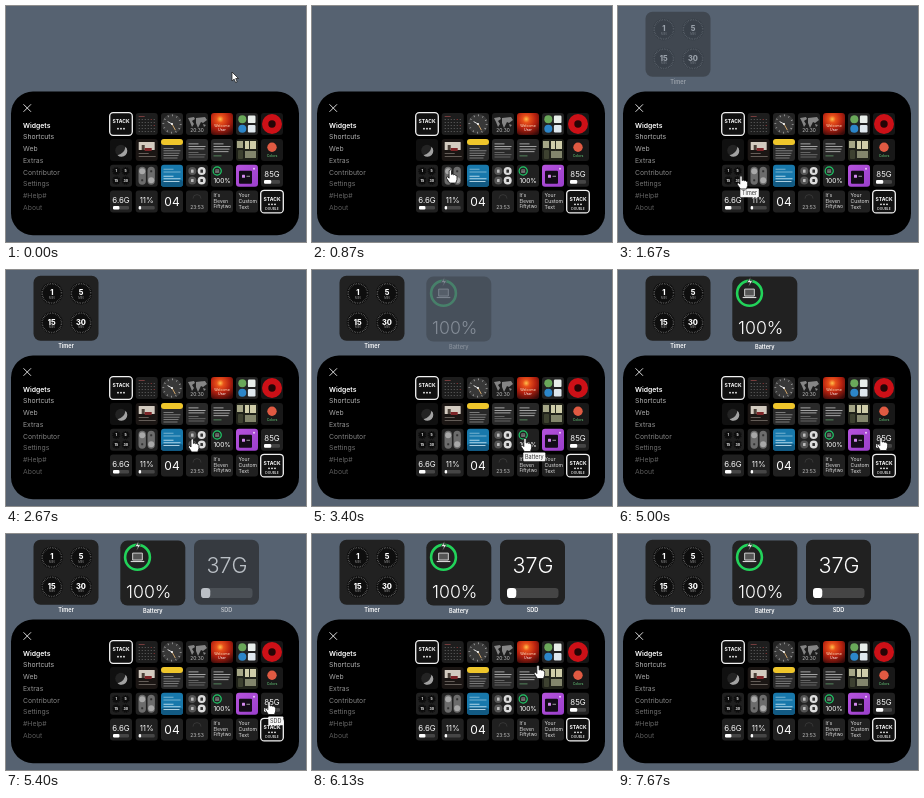
These frames come from a looping animation (300 px wide and 236 px high, 9 s). An HTML page:

```html
<!DOCTYPE html>
<html lang="en">
<head>
<meta charset="utf-8">
<title>Widget picker</title>
<style>
html, body { margin: 0; width: 100%; height: 100%; overflow: hidden; background: #566271; }
svg { display: block; width: 100vw; height: 100vh; font-family: Inter, Roboto, sans-serif; }
</style>
</head>
<body>
<svg id="stage" viewBox="0 0 300 236"></svg>
<script>
const FRAME = 0.015, LOOP = 9000;
const TAU = Math.PI * 2;

const rect = (x, y, w, h, r, fill, extra = '') =>
  `<rect x="${x}" y="${y}" width="${w}" height="${h}" rx="${r}" fill="${fill}" ${extra}/>`;
const disc = (x, y, r, fill, extra = '') =>
  `<circle cx="${x}" cy="${y}" r="${r}" fill="${fill}" ${extra}/>`;
const ring = (x, y, r, color, w, extra = '') =>
  disc(x, y, r, 'none', `stroke="${color}" stroke-width="${w}" ${extra}`);
const path = (d, color, w, fill = 'none') =>
  `<path d="${d}" fill="${fill}" stroke="${color}" stroke-width="${w}"/>`;
const text = (x, y, size, str, fill = '#fff', weight = 400, anchor = 'middle') =>
  `<text x="${x}" y="${y}" font-size="${size}" fill="${fill}" font-weight="${weight}" text-anchor="${anchor}">${str}</text>`;
const group = (x, y, body, scale = 1) =>
  `<g transform="translate(${x} ${y}) scale(${scale})">${body}</g>`;
const range = n => [...Array(n).keys()];

const ticks = (r, color, w, len, n) => {
  const step = TAU * r / n;
  return ring(0, 0, r, color, len, `stroke-dasharray="${w} ${step - w}"`);
};
const hand = (turn, len, color, w) =>
  path(`M0 0L${Math.sin(turn * TAU) * len} ${-Math.cos(turn * TAU) * len}`, color, w);
const laptop = (x, y, s) => group(x, y,
  path('M-4.6 -4h9.2v6.6h-9.2z', '#d8d8d8', 0.9, '#555') + path('M-6.5 4h13', '#d8d8d8', 1.1), s);
const lines = (n, x, y, gap, color) =>
  range(n).map(i => rect(x, y + i * gap, 10 + (i * 7) % 8, 0.8, 0, color)).join('');
const bar = (x, y, w, h, part) =>
  rect(x, y, w, h, h / 3, '#454545') + rect(x, y, w * part, h, h / 3, '#fff');

// Tiles are 22 by 22, drawn around their own centre
const stack = sub => rect(-11.3, -11.3, 22.6, 22.6, 3.5, '#111', 'stroke="#f2f2f2" stroke-width="1.3"') +
  text(0, sub ? -0.5 : -0.8, 5, 'STACK', '#fff', 700) +
  [-3, 0, 3].map(x => disc(x, sub ? 2.7 : 4.7, 0.85, '#fff')).join('') +
  (sub ? text(0, 8.2, 3.3, sub, '#ddd', 600) : '');
const meter = (label, part) => text(0, 0.9, 7.8, label, '#f4f4f4') + bar(-8, 4.3, 16, 3.6, part);
const quads = fn => range(4).map(i => group(i % 2 ? 4.7 : -4.7, i > 1 ? 4.7 : -4.7, fn(i))).join('');
const words = (list, size) =>
  list.map((s, i) => text(-8.5, -4.3 + i * size * 1.17, size, s, '#e4e4e4', 400, 'start')).join('');

const tiles = [
  ['#111', stack()],
  ['#1d1d1d', rect(-8, -8, 6, 0.8, 0, '#8a4444') + range(30).map(i =>
    disc(-7.5 + i % 6 * 3, -4.5 + Math.floor(i / 6) * 3, 0.5, i % 13 == 4 ? '#c04444' : '#7a7a7a')).join('')],
  ['#222', disc(0, 0, 10, '#383838') + ticks(8.6, '#b5b5b5', 0.7, 1.8, 12) +
    hand(0.83, 5, '#e0e0e0', 1) + hand(0.42, 7, '#e0b070', 0.9) + disc(0, 0, 1, '#fff')],
  ['#1d1d1d', '<path d="M-9-6l6-1 1 2-3 2 2 3-2 3-2-5zM-1-6l9-1 2 3-4 3-2-1-1 2-2 4-2-5zM6 0l3 1-2 2z" fill="#858585"/>' +
    text(0, 8.3, 4.8, '20:30', '#c9c9c9')],
  ['url(#sunset)', text(0, 2.6, 3.5, 'Welcome', '#ffe9c9') + text(0, 6.9, 3.5, 'User')],
  ['#222', quads(i => i % 2 ? rect(-3.8, -3.8, 7.6, 7.6, 1.2, i > 1 ? '#dfe8ee' : '#e8eeea')
    : disc(0, 0, 4, i > 1 ? '#2c86c9' : '#6aa85a'))],
  ['#151515', disc(0, 0, 10, '#cc1017') + disc(0, 0, 3.7, '#250506')],

  ['#101010', disc(0, 0.5, 5.8, '#232323') + '<path d="M4.5-3.2A5.8 5.8 0 0 1-3.5 5.2Q3.5 3.5 4.5-3.2" fill="#a2a2a2"/>'],
  ['#1b1614', rect(-8, -8, 16, 8, 0.5, '#d3cbc0') + rect(-5, -5, 3, 5, 0, '#4b4038') +
    rect(-2, -2, 7, 3, 0, '#7d2528') + lines(2, -8, 3, 3, '#77706a')],
  ['#282828', rect(-11, -11, 22, 6, 3, '#efc62b') + lines(5, -8.5, -2, 2.4, '#8f8f8f')],
  ['#292929', lines(3, -8.5, -6.5, 2.5, '#c4c4c4') + lines(3, -8.5, 2, 2.3, '#737373')],
  ['#262626', lines(4, -8.5, -6.5, 2.6, '#c0c0c0') + rect(-8.5, 5.5, 8, 0.8, 0, '#5f9a68')],
  ['#20221a', rect(-10, -9, 6, 7, 0, '#a5a686') + rect(-2, -9, 11, 8, 0, '#cfcda9') +
    rect(2, -9, 1, 17, 0, '#2a2c20') + rect(-2, 1, 11, 7, 0, '#83866c') + rect(-9, 0, 5, 9, 1, '#3d4130')],
  ['#181818', disc(0, -2.8, 4.7, '#e05a42') + text(0, 7, 3.4, 'Colors', '#58a968', 600)],

  ['#202020', quads(i => disc(0, 0, 4.2, '#0c0c0c') + ticks(3.7, '#555', 0.4, 0.6, 12) +
    text(0, 1.3, 3.5, [1, 5, 15, 30][i], '#fff', 700))],
  ['#222', [-4.5, 4.5].map(x => rect(x - 3.7, -9, 7.4, 18, 3.7, '#6c6c6c') +
    disc(x, x, 3, '#a8a8a8') + rect(x - 1, -x - 1, 2, 2, 0.5, '#333')).join('')],
  ['#1878ab', rect(-11, 4, 22, 7, 3, '#125a83') + lines(2, -8.5, -7, 2.8, '#8cc1da') +
    lines(3, -8.5, 0, 2.6, '#d4edf8')],
  ['#222', quads(i => disc(0, 0, 4, i % 2 ? '#dcdcdc' : '#555') + rect(-1.3, -1.6, 2.6, 3.2, 0.5, i % 2 ? '#333' : '#bbb'))],
  ['#202020', ring(-4.8, -4.8, 4.1, '#20c968', 1.2) + laptop(-4.8, -4.8, 0.34) + text(0, 7.7, 6.5, '100%')],
  ['url(#violet)', rect(-8, -5, 13, 13, 1, '#130b18') + rect(-5, -1, 3, 3, 0.5, '#d48af0') +
    rect(-0.5, 0, 3.5, 0.9, 0, '#aaa') + disc(7, -7, 1, '#edc9fa')],
  ['#202020', meter('85G', 0.45)],

  ['#202020', meter('6.6G', 0.4)],
  ['#202020', meter('11%', 0.15)],
  ['#202020', text(0, 4.3, 12, '04')],
  ['#202020', path('M-4 -3a4 4 0 0 1 8 0', '#444', 0.6) + text(0, 7.4, 5, '23:53', '#c6c6c6')],
  ['#202020', words(["It's", 'Eleven', 'Fiftytwo'], 4.6)],
  ['#202020', words(['Your', 'Custom', 'Text'], 5.1)],
  ['#111', stack('DOUBLE')]
];
const cols = [115, 140.7, 166, 191, 216, 241, 266], rows = [118, 144, 169.8, 195.6];
const grid = tiles.map(([fill, body], i) =>
  group(cols[i % 7], rows[Math.floor(i / 7)], rect(-11, -11, 22, 22, 3, fill) + body)).join('');

const menu = [['Widgets', '#fff'], ['Shortcuts', '#b5b5b5'], ['Web', '#a2a2a2'], ['Extras', '#929292'],
  ['Contributor', '#808080'], ['Settings', '#707070'], ['#Help#', '#626262'], ['About', '#585858']]
  .map(([s, c], i) => text(17, 121.7 + i * 11.75, 6.85, s, c, i ? 400 : 600, 'start')).join('');

const dial = (x, y, n) => group(x, y, disc(0, 0, 11, '#0e0e0e') + ticks(9.7, '#8a8a8a', 0.45, 1.5, 36) +
  text(0, 1.8, 7.4, n, '#fff', 800) + text(0, 5.6, 2.8, 'MIN', '#999'));
const widget = (id, x, y, label, body) => `<g id="${id}">` + rect(x, y, 65, 65, 7, '#212121') +
  body + text(x + 32.5, y + 72.2, 5.6, label, '#fff', 600) + '</g>';
const widgets =
  widget('timer', 27.5, 5.7, 'Timer', dial(45.8, 23.4, 1) + dial(75, 23.4, 5) + dial(45.8, 52.8, 15) + dial(75, 52.8, 30)) +
  widget('battery', 114.3, 6.6, 'Battery', ring(131.5, 23.3, 12.4, '#22d35a', 2.6) + laptop(131.5, 23.3, 1.05) +
    path('M133 6.8l-4 5.6h2.7l-1.2 4 4.2-5.7h-2.8z', '#212121', 0.7, '#fff') +
    text(120, 64, 17.7, '100%', '#fff', 300, 'start')) +
  widget('disk', 188, 5.8, 'SDD', text(221, 39, 21.5, '37G', '#fff', 300) + bar(195, 54, 51.5, 10, 0.18));

const tip = (id, x, w, s) => `<g id="${id}">` + rect(x, 182.4, w, 8.8, 0.8, '#f7f7f7') +
  text(x + w / 2, 188.9, 5.5, s, '#333') + '</g>';

document.getElementById('stage').innerHTML = `<defs>
  <radialGradient id="sunset" cx=".42" cy=".28" r=".8"><stop stop-color="#ffc04a"/><stop offset=".2" stop-color="#e8501a"/><stop offset=".55" stop-color="#b5200f"/><stop offset="1" stop-color="#3d0b0a"/></radialGradient>
  <linearGradient id="violet" x2="1" y2="1"><stop stop-color="#b553dc"/><stop offset="1" stop-color="#9a3fcb"/></linearGradient></defs>` +
  rect(0, 0, 300, 236, 0, '#566271') + rect(5, 85.6, 288, 143.6, 22, '#000') +
  path('M17.5 98.3l7.5 7.5M25 98.3l-7.5 7.5', '#eee', 0.9) + menu + grid + widgets +
  tip('tipTimer', 122.3, 18.5, 'Timer') + tip('tipBattery', 211.3, 22, 'Battery') + tip('tipDisk', 262.3, 15, 'SDD') +
  `<g id="cursor">
  <path id="arrow" d="M0 0v9l2.1-1.9 1.5 3.4 1.6-.7-1.5-3.3h2.8z" fill="#fff" stroke="#111" stroke-width=".7"/>
  <path id="hand" d="M-1.2 1.2Q0-.8 1.2 1.2V5Q2.4 4 3.3 5.2 4.5 4.4 5.2 5.8 6.7 5.4 6.7 7.2V10L5.5 13.5H-.6L-3.8 8.7Q-4 7-2.6 7.2L-1.2 8.6z" fill="#fff" stroke="#111" stroke-width=".8"/></g>`;

const get = id => document.getElementById(id);
const linear = p => p, easeOut = p => p * (2 - p), easeBoth = p => p * p * (3 - 2 * p);
// Ticks are fifteenths of a second: tick, x, y, easing into it
const route = [
  [0, 226, 66], [14, 137, 165, easeBoth], [20, 123, 169.5, easeOut], [35, 123, 169.5],
  [46, 213, 168, easeOut], [62, 213, 168], [63, 213, 168.5], [67, 213, 168.5],
  [75, 263, 167, easeBoth], [83, 263, 167], [92, 226, 131], [99, 136, 68],
  [101, 144, 65], [104, 144, 65], [115, 26, 245, easeBoth], [135, 26, 245]
];
const fades = [['timer', 24, 5], ['battery', 51, 3.7], ['disk', 79, 5]];
const hints = [['tipTimer', 24, 36], ['tipBattery', 51, 68], ['tipDisk', 79, 84]];

function locate(n) {
  const i = Math.max(1, route.findIndex(k => k[0] >= n));
  const [a, x, y] = route[i - 1], [b, u, v, ease = linear] = route[i];
  const p = ease((n - a) / (b - a));
  return [x + (u - x) * p, y + (v - y) * p];
}

function draw(now) {
  const n = Math.floor((now % LOOP + 4) * FRAME) % 135;
  for (const [id, from, len] of fades)
    get(id).setAttribute('opacity', Math.max(0, Math.min(1, (n - from + 1) / len)));
  for (const [id, from, to] of hints)
    get(id).setAttribute('visibility', n >= from && n < to ? 'visible' : 'hidden');
  const [x, y] = locate(n);
  const over = x > 103 && x < 278 && y > 106 && y < 207;
  get('cursor').setAttribute('transform', `translate(${x} ${y})`);
  get('hand').setAttribute('visibility', over ? 'visible' : 'hidden');
  get('arrow').setAttribute('visibility', over ? 'hidden' : 'visible');
}

const start = performance.now();
const loop = () => { draw(performance.now() - start); requestAnimationFrame(loop); };
loop();
</script>
</body>
</html>
```
